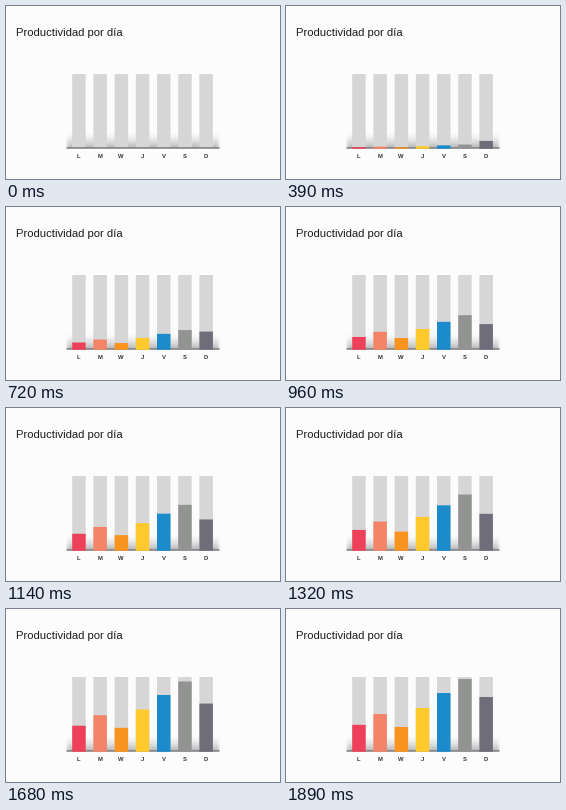
Write a matplotlib script that moves like this. It is 274 by 173 pixels and loops after 4440 ms.

```python
import numpy as np
import matplotlib.pyplot as plt
from matplotlib.animation import FuncAnimation
from matplotlib.patches import Rectangle

W, H, DPI = 274, 173, 64
STEP, FRAMES = 30, 148
START, END = 4.6, 63

BASE, TOP = 142.8, 68
LEFT, PITCH, WIDTH = 66.2, 21.2, 13.5

# day, colour, final height
DAYS = [
    ("L", "#ee4159", 27.0),
    ("M", "#f48468", 37.8),
    ("W", "#f7931e", 24.8),
    ("J", "#fdc92c", 43.8),
    ("V", "#1c8bcc", 58.8),
    ("S", "#929492", 72.8),
    ("D", "#706d7b", 54.8),
]


def px(size):
    return size * 72 / DPI


def ease(u, x1=0.33, x2=0.63):
    """Cubic Bezier easing with flat ends, solved by bisection."""
    lo, hi = 0.0, 1.0
    for _ in range(30):
        s = (lo + hi) / 2
        x = 3 * (1 - s) ** 2 * s * x1 + 3 * (1 - s) * s * s * x2 + s ** 3
        lo, hi = (s, hi) if x < u else (lo, s)
    return s * s * (3 - 2 * s)


def box(x, y, w, h, color, z):
    patch = Rectangle((x, y), w, h, fc=color, lw=0, zorder=z, snap=False)
    ax.add_patch(patch)
    return patch


fig = plt.figure(figsize=(W / DPI, H / DPI), dpi=DPI, facecolor="#fcfcfc")
ax = fig.add_axes([0, 0, 1, 1])
ax.axis("off")

# soft shadow rising from the axis
rows = np.linspace(0, 1, 17)[:, None] ** 1.7
cols = np.clip(np.minimum(np.arange(154), np.arange(154)[::-1]) / 5 + 0.35, 0, 1)
shade = np.zeros((17, 154, 4))
shade[..., :3] = 0.45
shade[..., 3] = 0.5 * rows * cols
ax.imshow(shade, extent=(60, 214, 142, 125), aspect="auto",
          interpolation="nearest", zorder=1)
ax.set_xlim(0, W)
ax.set_ylim(H, 0)

box(60.5, 141.3, 153, 1.4, "#77747a", 3)
ax.text(10, 30.2, "Productividad por día", family="Liberation Sans",
        size=px(11.2), color="#1c1c1c", va="baseline")

bars = []
for i, (day, color, _) in enumerate(DAYS):
    x = LEFT + i * PITCH
    box(x, TOP, WIDTH, 141.6 - TOP, "#d6d6d6", 2)
    bars.append(box(x, BASE, WIDTH, 0, color, 4))
    ax.text(x + WIDTH / 2 - 0.3, 151.8, day, family="Liberation Sans",
            weight="bold", size=px(5.9), color="#333333",
            ha="center", va="baseline")


def draw(n):
    u = min(max((n - START) / (END - START), 0), 1)
    curved = ease(u) if 0 < u < 1 else u
    for bar, (day, _, full) in zip(bars, DAYS):
        h = full * (u if day == "D" else curved)
        bar.set_y(BASE - h)
        bar.set_height(h)
        bar.set_visible(h > 0)
    return bars


anim = FuncAnimation(fig, draw, frames=FRAMES, interval=STEP,
                     init_func=lambda: draw(0), repeat=True, repeat_delay=0)
plt.show()
```
